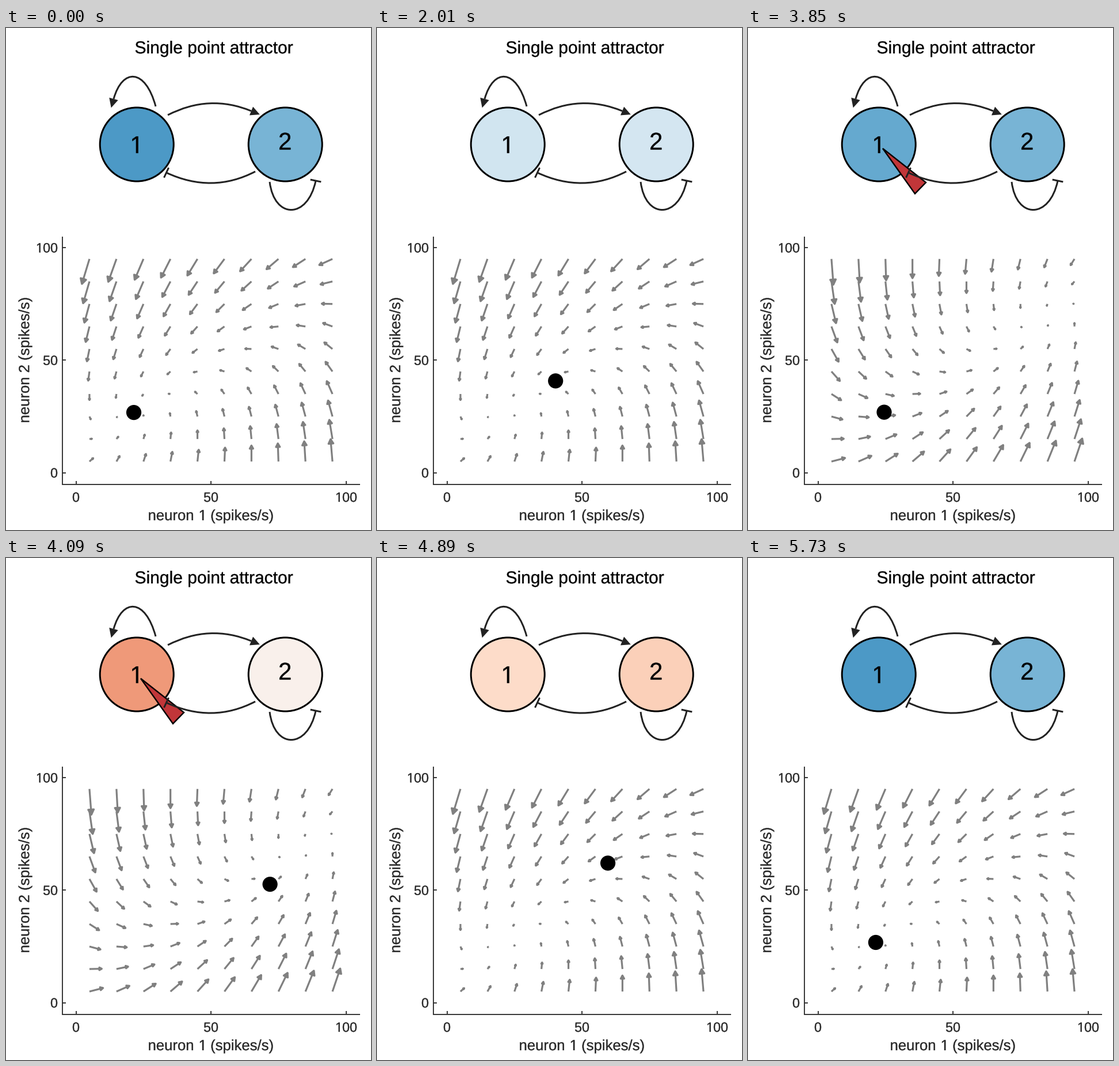
Animation, 634 px wide and 871 px high, one loop 5770 ms. Source, as a matplotlib script:

```python
import numpy as np
import matplotlib.pyplot as plt
from matplotlib.animation import FuncAnimation
from matplotlib.patches import Circle, PathPatch, Polygon
from matplotlib.path import Path
from matplotlib.textpath import TextPath
from matplotlib.transforms import Affine2D

W, H, DPI = 634, 871, 64
PT = 72 / DPI
LOOP, STEP = 5770, 10
INK, GREY, LINE = "#262626", "#808080", "#222222"

# Two-neuron linear network: dr/dt = A r + drive
A = np.array([[-0.5, -1.0], [2.0, -3.0]])
BASE = 37.5
DECAY, OMEGA = 1.75, np.sqrt(7) / 4
TAU = 240  # ms
PULSES = [(990, 1984, 25), (3840, 4794, 75)]  # onset, offset, strength
# first and last moment of each stretch of motion
SPANS = [(0, 0), (1000, 1960), (2010, 2850), (3850, 5730)]

plt.rcParams["path.simplify"] = False
ramp = plt.get_cmap("RdBu_r")
fig = plt.figure(figsize=(W / DPI, H / DPI), dpi=DPI, facecolor="white")
ax = fig.add_axes([0, 0, 1, 1])
ax.set_xlim(0, W)
ax.set_ylim(H, 0)
ax.axis("off")


def px(x):
    return 121.5 + 4.69 * x


def py(y):
    return 771.7 - 3.905 * y


def glyphs(text, size):
    path = TextPath((0, 0), text, size=size, prop={"family": "Liberation Sans"})
    verts = path.vertices.copy()
    if text == "1":  # fold the foot serif into the stem
        foot = verts[:, 1] < 0.1 * size
        verts[foot, 0] = np.clip(verts[foot, 0], 0.251 * size, 0.34 * size)
        verts[:, 0] += 0.033 * size
    return Path(verts, path.codes)


def write(x, y, size, runs, color="black", turn=0):
    """Draw text runs given as (offset in em, string) from a pen position."""
    for offset, text in runs:
        place = Affine2D().translate(offset * size, 0).scale(1, -1)
        place.rotate_deg(turn).translate(x, y)
        ax.add_patch(PathPatch(glyphs(text, size).transformed(place), fc=color,
                               ec=color, lw=0.35 * PT, zorder=5))


def number(n):
    text = str(n)
    return [(0.556 * i, digit) for i, digit in enumerate(text)]


def stroke(points, codes=None, color=LINE, width=3.0):
    ax.add_patch(PathPatch(Path(points, codes), fc="none", ec=color,
                           lw=width * PT, capstyle="butt", zorder=4))


def link(points, excites):
    """Bezier connection ending in an arrowhead or a blunt bar."""
    curve = Path.CURVE3 if len(points) == 3 else Path.CURVE4
    stroke(points, [Path.MOVETO] + [curve] * (len(points) - 1))
    end = np.array(points[-1])
    ahead = end - points[-2]
    ahead = ahead / np.hypot(*ahead)
    side = ahead[::-1] * [-1, 1]
    if excites:
        head = [end + 16 * ahead, end + 8 * side, end - 8 * side]
        ax.add_patch(Polygon(head, fc=LINE, ec="none", zorder=4))
    else:
        stroke([end - 9.5 * side, end + 9.5 * side])


def draw_circuit():
    link([(260, 136), (242, 69.5), (202, 69.5), (187, 123)], True)
    link([(281, 151), (353, 114), (426, 144)], True)
    link([(433, 249), (358, 288), (278.5, 251)], False)
    link([(458, 267), (466, 332), (524, 332), (538, 265)], False)
    write(214, 217, 42, number(1))
    write(473, 211, 42, number(2))


def draw_axes():
    stroke([(98, 362), (98, 791.5), (614.5, 791.5)], color=INK, width=1.8)
    size = 23.3
    for n in (0, 50, 100):
        x, y, wide = px(n), py(n), 0.556 * size * len(str(n))
        stroke([(x, 791), (x, 785.5)], color=INK, width=1.8)
        stroke([(98, y), (103.5, y)], color=INK, width=1.8)
        write(x - wide / 2, 822, size, number(n), INK)
        write(90 - wide, y + 8.2, size, number(n), INK)
    for x, y, turn, which in ((246.5, 854, 0, "1"), (40.2, 685.5, -90, "2")):
        runs = [(0, "neuron"), (3.391, which), (4.225, "(spikes/s)")]
        write(x, y, 25.7, runs, INK, turn)


def drive(extra):
    return np.array([BASE + extra, BASE])


def fixed_point(extra):
    return np.linalg.solve(A, -drive(extra))


def relax(start, goal, t):
    """Exact solution of the linear system, t in time constants."""
    d = start - goal
    swing = np.cos(OMEGA * t) * d + np.sin(OMEGA * t) / OMEGA * (A @ d + DECAY * d)
    return goal + np.exp(-DECAY * t) * swing


def state(ms):
    """Firing rates and strength of the active pulse (0 when off)."""
    rest = fixed_point(0)
    for on, off, extra in reversed(PULSES):
        peak = fixed_point(extra)
        if ms >= off:
            return relax(peak, rest, (ms - off) / TAU), 0
        if ms >= on:
            return relax(rest, peak, (ms - on) / TAU), extra
    return rest, 0


def flow_path(extra):
    grid = np.arange(5, 100, 10)
    pos = np.stack(np.meshgrid(grid, grid), -1).reshape(-1, 2)
    vel = pos @ A.T + drive(extra)
    # longest arrow is 0.9 of the grid cell's diagonal
    vel *= 0.9 * 9 * np.sqrt(2) / np.hypot(*vel.T).max()
    tail = np.column_stack([px(pos[:, 0]), py(pos[:, 1])])
    shaft = vel * [4.69, -3.905]
    side = 0.11 * shaft[:, ::-1] * [-1, 1]
    tip = tail + shaft
    neck = tip - 0.2 * shaft
    verts = np.stack([tail, tip, neck + side, tip, neck - side, neck + side], 1)
    codes = [Path.MOVETO, Path.LINETO, Path.MOVETO, Path.LINETO,
             Path.LINETO, Path.CLOSEPOLY]
    return Path(verts.reshape(-1, 2), codes * len(pos))


FLOWS = {extra: flow_path(extra) for extra in (0, 25, 75)}

write(223.5, 44, 30, [(0, "Single point attractor")])
draw_circuit()
draw_axes()
cells = [Circle((x, 202), 64, ec="black", lw=3 * PT, zorder=2)
         for x in (227.2, 485.2)]
probe = Polygon([(234, 209), (309, 268), (290, 287.5)], ec="black",
                lw=2.4 * PT, zorder=3)
flow = PathPatch(FLOWS[0], fc=GREY, ec=GREY, lw=3.2 * PT,
                 capstyle="butt", joinstyle="round", zorder=2)
dot = Circle((0, 0), 13.1, fc="black", lw=0, zorder=6)
for patch in (*cells, probe, flow, dot):
    ax.add_patch(patch)


def update(frame):
    ms = frame * STEP
    first, last = max(s for s in SPANS if s[0] <= ms)
    ms = min(first + (ms - first) // 40 * 40, last)
    rates, extra = state(ms)
    dot.center = px(rates[0]), py(rates[1])
    for cell, rate in zip(cells, rates):
        cell.set_facecolor(ramp(rate / 100))
    flow.set_path(FLOWS[extra])
    probe.set_visible(extra > 0)
    probe.set_facecolor(ramp(0.22 + 0.0085 * extra))
    return [*cells, probe, flow, dot]


anim = FuncAnimation(fig, update, frames=LOOP // STEP, interval=STEP,
                     repeat=True, repeat_delay=0, blit=False)
plt.show()
```
